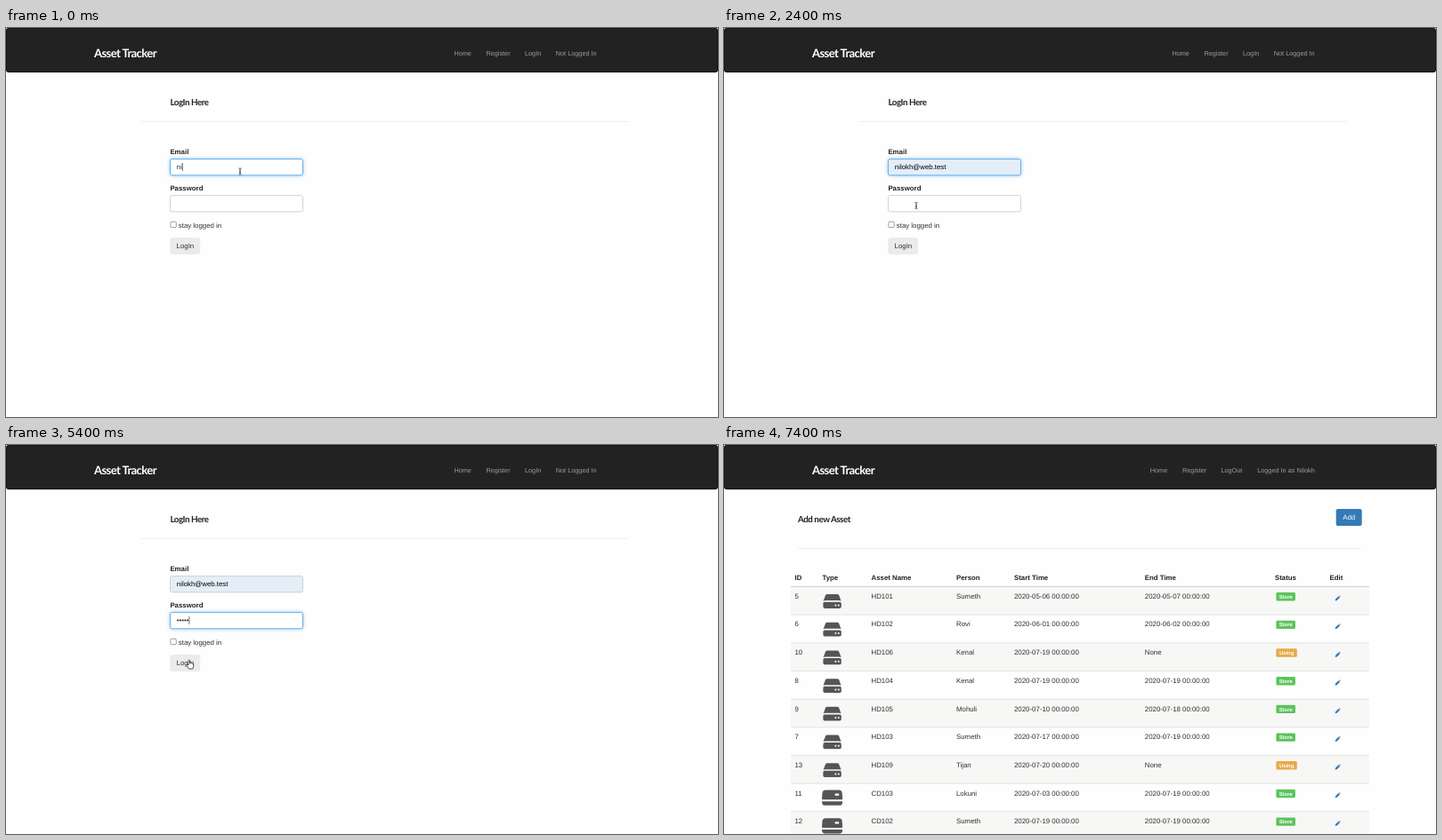
Write an HTML page that moves like this. It is 800 px wide and 438 px high and loops after 8000 ms.

```html
<!DOCTYPE html>
<html lang="en">
<head>
<meta charset="utf-8">
<title>Asset Tracker</title>
<style>
  html, body { margin: 0; width: 100%; height: 100%; overflow: hidden; background: #fefefe; }
  svg { display: block; width: 800px; height: 438px; }
  text { font: 7.85px "Liberation Sans", Arial, sans-serif; fill: #303030; text-rendering: geometricPrecision; white-space: pre; }
  .bold { font-weight: bold; fill: #222; }
  .display { font: bold 9.8px Lato, sans-serif; letter-spacing: -.047em; fill: #222; }
  .brand { font-size: 13.1px; fill: #fff; }
  .nav { font-size: 7.3px; fill: #9d9d9d; }
  .badge { font-size: 5.9px; font-weight: bold; fill: #fff; text-anchor: middle; }
  .white { fill: #fff; }
  .rule { stroke: #ebebeb; stroke-width: .8; }
  .line { stroke: #ddd; stroke-width: .8; }
  .input { fill: #fff; stroke: #c8c8c8; stroke-width: .8; }
  .input.filled { fill: #e3eef8; }
  .input.focus { stroke: #66afe9; stroke-width: 1; filter: drop-shadow(0 0 2px rgba(102, 175, 233, .65)); }
  .button { fill: #ebebeb; stroke: #e6e6e6; stroke-width: .6; }
  .button.focus { fill: #e6e6e6; stroke: #2f74c0; stroke-width: 1.5; }
  .caret { stroke: #333; stroke-width: .7; }
</style>
</head>
<body>
<svg viewBox="0 0 800 438">
  <defs>
    <g id="drive" fill="#555">
      <path d="M5.2 0H16.8Q18 0 18.6 1.2L21 7.6Q20 7 19 7H3Q2 7 1 7.6L3.4 1.2Q4 0 5.2 0Z"/>
      <rect x=".8" y="8.6" width="20.4" height="7.2" rx="1.8"/>
      <g fill="#fff"><circle cx="14.8" cy="12.3" r="1"/><circle cx="18.2" cy="12.3" r="1"/></g>
    </g>
    <g id="disc" fill="#555">
      <path d="M3 -1.3H19Q21.5 -1.3 22 1.2L22.6 8.2Q22.7 9.5 21.4 9.5H.6Q-.7 9.5 -.6 8.2L0 1.2Q.5 -1.3 3 -1.3Z"/>
      <path d="M-.5 11.5H22.5V12.8Q22 16 19 16H3Q0 16 -.5 12.8Z"/>
      <rect x="14" y="2.7" width="4.6" height="2.2" rx=".6" fill="#fff"/>
    </g>
    <path id="pencil" fill="#337ab7" d="M-2.8 2.8L-2.3 .7L1 -2.6L2.6 -1L-.7 2.3ZM1.5 -3L2 -3.3Q2.4 -3.4 3.2 -2.5Q3.5 -2 3 -1.5Z"/>
    <path id="ibeam" fill="none" stroke="#555" stroke-width=".8" d="M-1.7 -3.7Q0 -3.7 0 -2.5V2.5Q0 3.7 -1.7 3.7M1.7 -3.7Q0 -3.7 0 -2.5V2.5Q0 3.7 1.7 3.7M-1 1.2H1"/>
    <path id="arrow" fill="#111" stroke="#fff" stroke-width=".5" d="M0 0V7L1.6 5.5L2.7 8.1L3.9 7.6L2.8 5.1H5Z"/>
    <path id="hand" fill="#fff" stroke="#222" stroke-width=".8" stroke-linejoin="round" d="M-2 1.2V-4.2Q-1.2 -5.2 -.4 -4.2V-1.2Q.5 -2 1.1 -.9Q2 -1.6 2.5 -.5Q3.6 -1 3.7 .3V2.5L2.8 5.2H-1.4L-4 1.6Q-4.2 .2 -3 .3Z"/>
  </defs>

  <rect x=".4" y=".4" width="799.2" height="49.2" rx="2.4" fill="#222" stroke="#080808" stroke-width="1"/>
  <text class="display brand" x="99" y="33.2">Asset Tracker</text>

  <g id="login">
    <text class="display" x="184.5" y="87.2">LogIn Here</text>
    <path class="rule" d="M152 105.4H700"/>
    <text class="bold" x="184.4" y="141.8">Email</text>
    <rect id="email" class="input" x="184.5" y="147.6" width="149" height="18.2" rx="2"/>
    <text id="emailText" x="191.8" y="159.4"></text>
    <text class="bold" x="184.4" y="182.8">Password</text>
    <rect id="password" class="input" x="184.5" y="188.6" width="149" height="18.2" rx="2"/>
    <text id="passwordText" x="191.8" y="200.4"></text>
    <path id="caret" class="caret"/>
    <rect x="184.9" y="218.2" width="6.4" height="6.4" rx="1.2" fill="#fff" stroke="#767676" stroke-width=".7"/>
    <text x="193.8" y="224.9">stay logged in</text>
    <rect id="button" class="button" x="184.8" y="236.4" width="33" height="18" rx="2"/>
    <text x="191.6" y="248.1">LogIn</text>
    <use id="cursor"/>
  </g>

  <g id="assets">
    <text class="display" x="83" y="87.2">Add new Asset</text>
    <rect x="687.7" y="72" width="29" height="19" rx="2.2" fill="#337ab7"/>
    <text class="white" x="702.2" y="84.3" text-anchor="middle">Add</text>
    <path class="rule" d="M83 116.4H716"/>
  </g>
</svg>
<script>
const STEP = 200, LOOP = 8000, LOADED = 7000;
const EMAIL = "nilokh@web.test";
const $ = id => document.getElementById(id);
const text = (x, y, value, cls = "") => `<text class="${cls}" x="${x}" y="${y}">${value}</text>`;

const navItems = (labels, xs) => labels.map((label, i) => text(xs[i], 30.7, label, "nav")).join("");
$("login").innerHTML += navItems(["Home", "Register", "LogIn", "Not Logged In"], [503.4, 539.4, 583, 617.8]);

const columns = [79.5, 110.5, 165.5, 261, 326, 472.8, 619, 680.5];
const headings = ["ID", "Type", "Asset Name", "Person", "Start Time", "End Time", "Status", "Edit"];
// id, asset, person, start day, end day (none while in use)
const assets = [
  [5, "HD101", "Sumeth", "05-06", "05-07"],
  [6, "HD102", "Rovi", "06-01", "06-02"],
  [10, "HD106", "Kenal", "07-19"],
  [8, "HD104", "Kenal", "07-19", "07-19"],
  [9, "HD105", "Mohuli", "07-10", "07-18"],
  [7, "HD103", "Sumeth", "07-17", "07-19"],
  [13, "HD109", "Tijan", "07-20"],
  [11, "CD103", "Lokuni", "07-03", "07-19"],
  [12, "CD102", "Sumeth", "07-19", "07-19"]
];
const stamp = day => day ? `2020-${day} 00:00:00` : "None";

function assetRow([id, name, person, start, end], i) {
  const top = 159.4 + i * 31.68, base = top + 13.4;
  const values = [id, , name, person, stamp(start), stamp(end)];
  const width = end ? 21.6 : 23.4;
  return `<rect x="75" y="${top}" width="650" height="31.68" fill="${i % 2 ? "#fefefe" : "#f7f7f6"}"/>
    <path class="line" d="M75 ${top}H725"/>
    ${values.map((value, c) => text(columns[c], base, value)).join("")}
    <use href="#${name.startsWith("HD") ? "drive" : "disc"}" x="110.6" y="${top + 8.7}"/>
    <rect x="620.4" y="${top + 6.6}" width="${width}" height="9.4" rx="1.4" fill="${end ? "#5cc35c" : "#e8a94a"}"/>
    ${text(620.4 + width / 2, top + 13.4, end ? "Store" : "Using", "badge")}
    <use href="#pencil" x="689.4" y="${top + 13.4}"/>`;
}

$("assets").innerHTML +=
  navItems(["Home", "Register", "LogOut", "Logged In as Nilokh"], [478.8, 515, 558.4, 599.2]) +
  headings.map((heading, c) => text(columns[c], 151.7, heading, "bold")).join("") +
  assets.map(assetRow).join("") +
  '<path d="M75 159.3H725" stroke="#d5d5d5"/>';

// time, shape, x, y: straight moves between the points
const path = [
  [0, "ibeam", 263, 161.5], [400, "ibeam", 263, 161.5], [1000, "arrow", 250.3, 165.5],
  [1200, "arrow", 249.5, 166.6], [1800, "arrow", 232, 176], [2000, "ibeam", 224, 191],
  [2400, "ibeam", 216, 200], [4000, "ibeam", 216, 200], [4200, "arrow", 216, 201],
  [4400, "arrow", 216, 201], [5000, "arrow", 208, 257], [5200, "hand", 207, 250],
  [5400, "hand", 207, 246.8], [5600, "hand", 207, 246.8], [5800, "hand", 206.5, 246.8],
  [LOOP, "hand", 206.5, 246.8]
];

function cursorAt(t) {
  const i = path.findIndex((point, n) => t >= point[0] && t < path[n + 1][0]);
  const [t0, shape, x0, y0] = path[i], [t1, , x1, y1] = path[i + 1];
  const k = (t - t0) / (t1 - t0);
  return { shape, x: x0 + (x1 - x0) * k, y: y0 + (y1 - y0) * k };
}

const typed = (t, times) => times.filter(time => t >= time).length;

function render(now) {
  const t = Math.floor(now % LOOP / STEP) * STEP;
  const loaded = t >= LOADED, filled = t >= 1200;
  $("login").style.display = loaded ? "none" : "";
  $("assets").style.display = loaded ? "" : "none";

  const focus = t < 2600 ? "email" : t < 5800 ? "password" : "button";
  for (const id of ["email", "password", "button"]) $(id).classList.toggle("focus", focus === id);
  $("email").classList.toggle("filled", filled);

  const letters = 2 + typed(t, [200, 400]);
  $("emailText").textContent = filled ? EMAIL : EMAIL.slice(0, letters);
  $("emailText").style.fill = filled ? "#000" : "";
  $("passwordText").textContent = "•".repeat(typed(t, [3200, 3400, 3800, 4000, 4200]));

  const caretOn = focus === "email" ? t < 800 : focus === "password" && t >= 2800;
  const field = $(focus + "Text");
  if (field) {
    const x = 192.2 + field.getComputedTextLength(), y = focus === "email" ? 152 : 193;
    $("caret").setAttribute("d", `M${x} ${y}v9`);
  }
  $("caret").style.display = caretOn ? "" : "none";

  const { shape, x, y } = cursorAt(t);
  $("cursor").setAttribute("href", "#" + shape);
  $("cursor").setAttribute("transform", `translate(${x} ${y})`);
}

const start = performance.now();
function tick() {
  render(performance.now() - start);
  requestAnimationFrame(tick);
}
tick();
</script>
</body>
</html>
```
